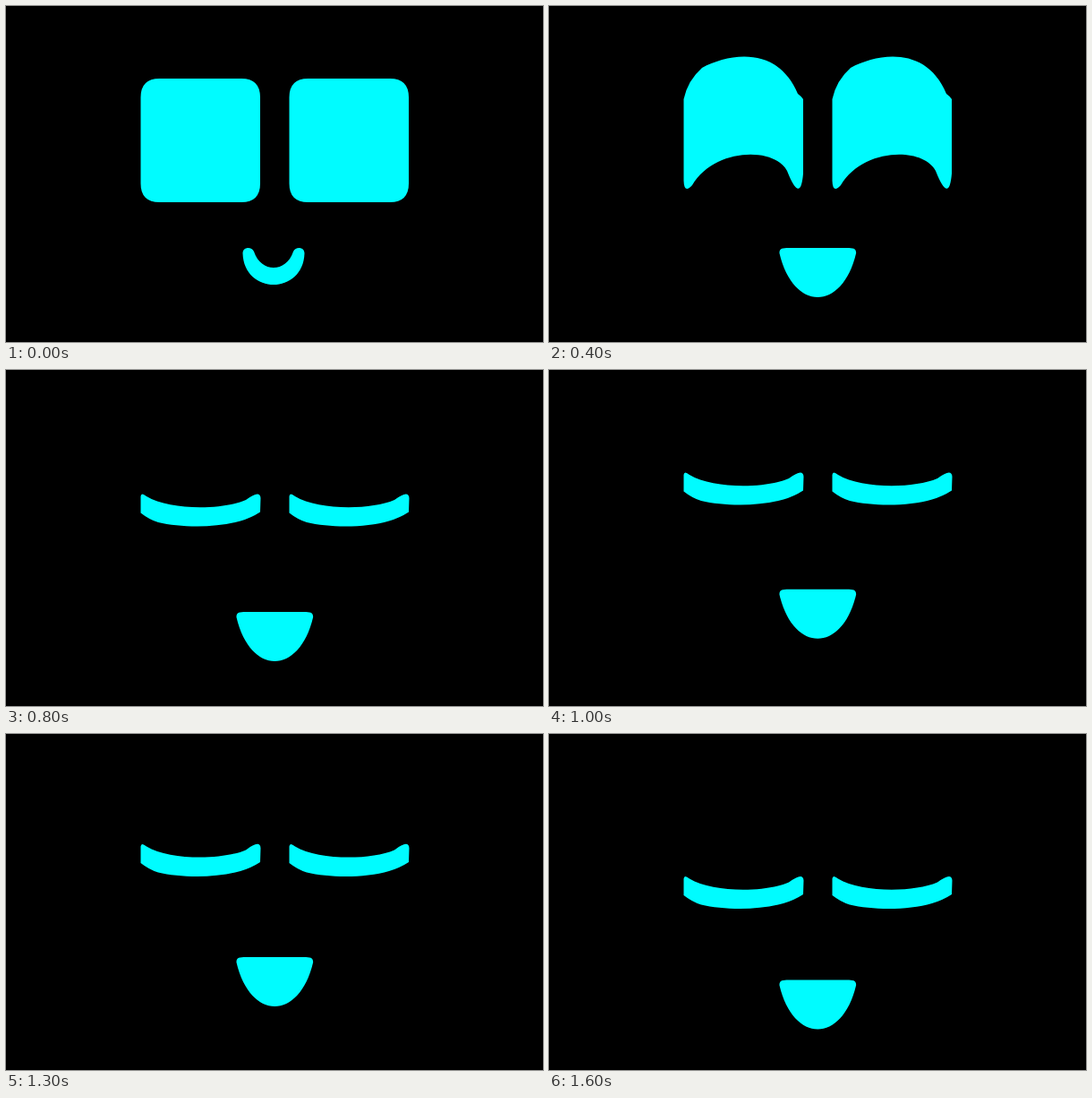
Animation, 600 px wide and 375 px high, one loop 5 s. Source, as an HTML page:

```html
<!DOCTYPE html>
<html lang="en">
<head>
<meta charset="utf-8">
<title>Happy face</title>
<style>
  html, body { margin: 0; width: 100%; height: 100%; overflow: hidden; background: #000; }
  svg { display: block; width: 100%; height: 100%; fill: #00fcff; }
</style>
</head>
<body>
<svg viewBox="0 0 600 375">
  <defs><path id="eye"/></defs>
  <g id="eyes">
    <use href="#eye"/>
    <use href="#eye" x="166"/>
  </g>
  <path id="mouth"/>
</svg>
<script>
const LOOP = 5000, STEP = 100;
const POINTS = { M: 1, L: 1, Q: 2, C: 3 };
const byId = id => document.getElementById(id);
const mix = (a, b, k) => a + (b - a) * k;

// Eye outline, clockwise: corner, top, corner, right side, corner, bottom, corner.
const EYE = "MQCQLQCQ", MOUTH = "MCCCC";

function box(l, t, r, b, c) {
  const x1 = mix(l, r, 1 / 3), x2 = mix(l, r, 2 / 3);
  return [[l, t + c], [l, t], [l + c, t], [x1, t], [x2, t], [r - c, t], [r, t], [r, t + c],
          [r, b - c], [r, b], [r - c, b], [x2, b], [x1, b], [l + c, b], [l, b], [l, b - c]];
}

const eyeOpen = box(150.5, 81, 284, 219, 21);
const eyeArch = [
  [150.5, 104], [155, 83], [171, 69],
  [203, 52], [256, 45], [278, 98], [281, 100], [284, 104],
  [284, 187], [281, 222], [266, 184],
  [252, 157], [185, 158], [160, 200], [151, 210], [150.5, 195]];
const eyeShut = [
  [150.5, 141], [151, 136], [157, 141],
  [183, 156.5], [241, 156.5], [268, 145], [284, 133], [284.5, 143],
  [284, 158.5], [274, 165], [262, 168.5],
  [235, 176.5], [195, 176], [170, 170], [160, 167], [150.5, 159.5]];

// Mouth from its left half: lip corner, top edge control, bottom edge control.
function mouth(mid, start, c1, c2, end, top, bottom) {
  const flip = ([x, y]) => [2 * mid - x, y];
  return [start, c1, c2, end, top, ...[top, end, c2, c1, start, bottom].map(flip), bottom, start];
}

const smile = mouth(299, [264.5, 276], [264.5, 268.5], [274.5, 268], [277, 274], [285, 298], [266, 322.7]);
const laugh = mouth(300.3, [257.5, 276], [257, 269], [263, 270], [275, 270], [290, 270], [273, 341.3]);

function morph(cmds, a, b, k) {
  let i = 0;
  const point = () => {
    const [p, q] = [a[i], b[i++]];
    return `${mix(p[0], q[0], k)} ${mix(p[1], q[1], k)}`;
  };
  return [...cmds].map(c => c + Array.from({ length: POINTS[c] }, point).join(" ")).join("") + "Z";
}

const span = (t, from, to) => Math.min(1, Math.max(0, (t - from) / (to - from)));
const easeOut = (p, power) => 1 - (1 - p) ** power;

function place(id, y) {
  byId(id).setAttribute("transform", `translate(0 ${y})`);
}

function draw(t) {
  const open = span(t, 0, 400), shut = span(t, 400, 800) ** 1.2;
  const rise = span(t, 800, 1200), fall = span(t, 1200, 1600);

  byId("eye").setAttribute("d", shut > 0
    ? morph(EYE, eyeArch, eyeShut, shut)
    : morph(EYE, eyeOpen, eyeArch, open));
  byId("mouth").setAttribute("d", morph(MOUTH, smile, laugh, open));

  place("eyes", 52.5 * easeOut(fall, 1.3) - 32 * easeOut(rise, 2));
  place("mouth", 43.5 * easeOut(fall, 1.85) - 39 * easeOut(rise, 1.5));
}

const start = performance.now();
function tick() {
  const t = (performance.now() - start) % LOOP;
  draw(Math.floor(t / STEP) * STEP);
  requestAnimationFrame(tick);
}
tick();
</script>
</body>
</html>
```
